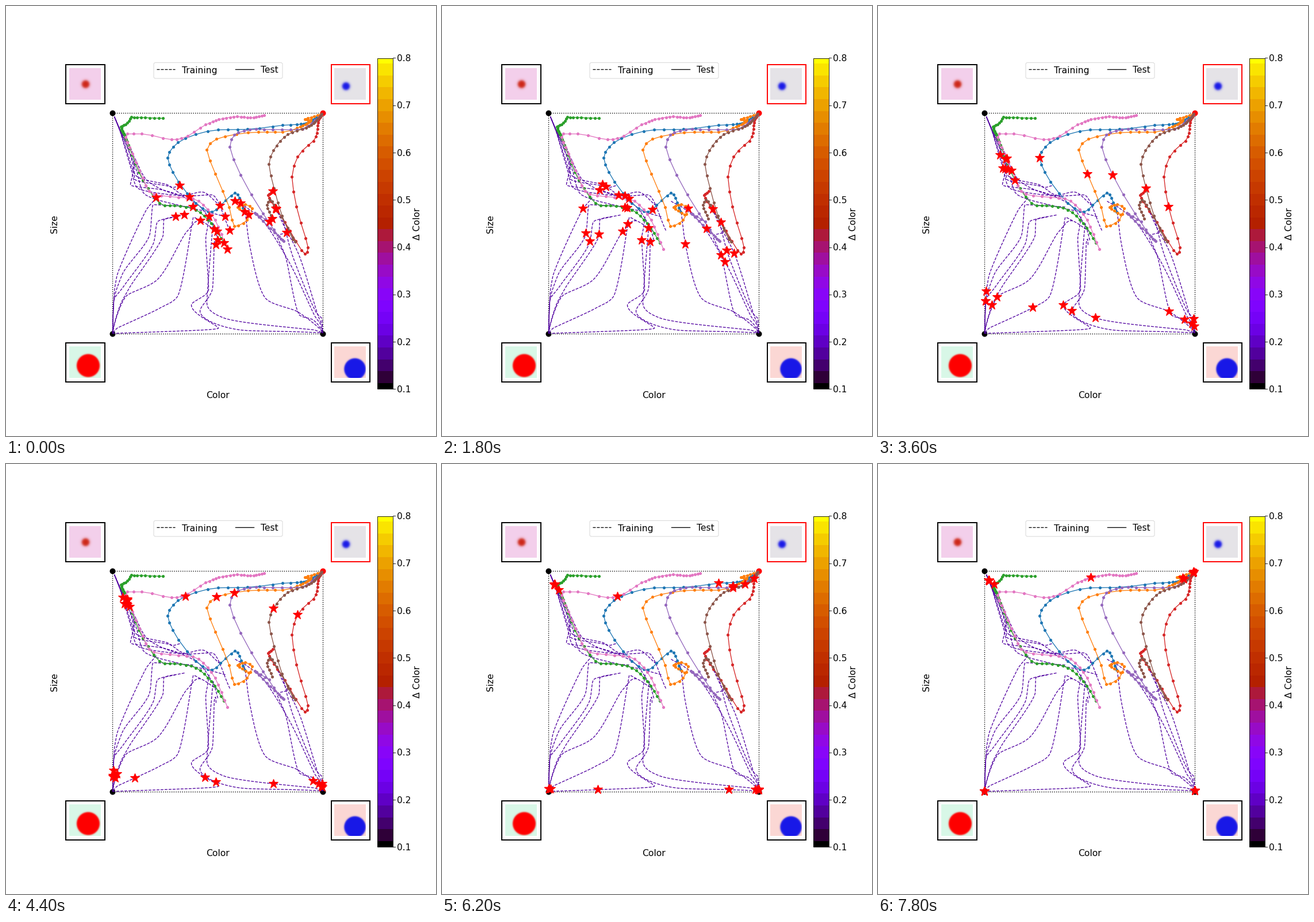
A matplotlib script that plays this animation: 748 px wide and 748 px high, repeating every 8000 ms.

```python
import numpy as np
import matplotlib.pyplot as plt
from matplotlib.animation import FuncAnimation
from matplotlib.patches import FancyBboxPatch, Rectangle

SIZE, FRAMES, STEP = 748, 40, 200
LW = 0.95
LEFT, RIGHT, TOP, BOTTOM = 185, 551, 186, 570
BEATS = (0, 4.5, 9, 14, 18, 26, 31)  # steps at which training paths pass their points

plt.rcParams["font.family"] = "DejaVu Sans"
plt.rcParams["font.size"] = 11.2
fig = plt.figure(figsize=(SIZE / 100, SIZE / 100), dpi=100, facecolor="white")
ax = fig.add_axes([0, 0, 1, 1])
ax.axis("off")

tracks = []  # one position function per star


def glide(keys):
    """Monotone cubic path through (time, x, y) keys."""
    k = np.array(keys, float)
    times, pts = k[:, 0], k[:, 1:]
    h = np.diff(times)[:, None]
    d = np.diff(pts, axis=0) / h
    a, b = d[:-1], d[1:]
    wa, wb = 2 * h[1:] + h[:-1], h[1:] + 2 * h[:-1]
    with np.errstate(divide="ignore", invalid="ignore"):
        inner = np.where(a * b > 0, (wa + wb) / (wa / a + wb / b), 0)
    m = np.vstack([d[:1], inner, d[-1:]])

    def at(t):
        t = np.clip(np.atleast_1d(t), times[0], times[-1])
        i = np.clip(np.searchsorted(times, t, side="right") - 1, 0, len(h) - 1)
        u = ((t - times[i]) / h[i, 0])[:, None]
        return (pts[i] * (1 + 2 * u) * (1 - u) ** 2
                + pts[i + 1] * u * u * (3 - 2 * u)
                + h[i] * (m[i] * u * (1 - u) ** 2 - m[i + 1] * u * u * (1 - u)))

    return at


def add_path(keys, times, style, **kw):
    at = glide(keys)
    ax.plot(*at(times).T, style, lw=LW, **kw)
    tracks.append(lambda n: at(n)[0])


def train(hub, end, t_end, *paths):
    """Dashed paths that close in on a hub, then creep to the end point."""
    hub = np.array(hub)
    for pts in paths:
        if len(pts) < len(BEATS):
            pts = (*pts, hub + 0.08 * (np.array(pts[-1]) - hub))
        keys = [(t, *p) for t, p in zip(BEATS, pts)] + [(t_end, *end)]
        add_path(keys, np.linspace(0, t_end, 240), "--", color="#5000a0", zorder=3)


def test(color, *keys):
    """Solid path with a dot at every step."""
    add_path(keys, np.arange(keys[-1][0] + 1), "-o", color="tab:" + color,
             ms=3.7, mew=0, zorder=4)


def thumb(x, y, back, spot, cx, cy, r, soft, edge="black"):
    """Framed picture of one blurred disc."""
    ax.add_patch(Rectangle((x, y), 67.5, 68, fc="white", ec=edge, lw=1.4, zorder=2))
    g = np.arange(55)
    dist = np.hypot(g[None, :] + x + 6 - cx, g[:, None] + y + 6.5 - cy)
    mix = (1 / (1 + np.exp((dist - r) / soft)))[..., None]
    img = (np.array(back) * (1 - mix) + np.array(spot) * mix) / 255
    ax.imshow(img, extent=(x + 5.5, x + 60.5, y + 61, y + 6),
              aspect="auto", zorder=2.5)


def upright(x, y, text):
    ax.text(x, y, text, rotation=90, rotation_mode="anchor", ha="center", va="baseline")


def color_bar(x0, x1, y0, y1, ticks=8, sub=4):
    """Bands centred on every quarter tick, cut off at both ends."""
    n = (ticks - 1) * sub
    half = (y1 - y0) / n / 2
    box = Rectangle((x0, y0), x1 - x0, y1 - y0, fill=False, ec="black", lw=0.6, zorder=3)
    ax.add_patch(box)
    bands = ax.imshow(np.arange(n, -1, -1)[:, None] / n, cmap="gnuplot", vmin=0, vmax=1,
                      extent=(x0, x1, y1 + half, y0 - half), aspect="auto",
                      interpolation="nearest")
    bands.set_clip_path(box)
    for i, y in enumerate(np.linspace(y1, y0, ticks)):
        ax.plot([x1, x1 + 4], [y, y], "k-", lw=0.6)
        ax.text(679.5, y + 5.5, f"0.{i + 1}")


# frame and corners
ax.plot([LEFT, RIGHT, RIGHT, LEFT, LEFT], [TOP, TOP, BOTTOM, BOTTOM, TOP],
        "k:", lw=1, zorder=1)
for x in (LEFT, RIGHT):
    for y in (TOP, BOTTOM):
        color = "red" if (x, y) == (RIGHT, TOP) else "black"
        ax.plot(x, y, "o", color=color, ms=7.2, mew=0, zorder=2)

RED, BLUE = (255, 0, 0), (24, 24, 232)
thumb(104, 101.5, (244, 208, 236), (205, 38, 22), 138, 135.5, 6.5, 1.3)
thumb(565.5, 101.5, (230, 228, 232), BLUE, 591.5, 139, 6.5, 1.2, "red")
thumb(104, 586, (216, 248, 232), RED, 142.5, 625.5, 20, 0.7)
thumb(565.5, 586, (252, 216, 212), BLUE, 607, 631.5, 18.7, 0.7)

# legend
ax.add_patch(FancyBboxPatch((256.5, 98), 224, 27.5, fc="white", ec="0.85", lw=0.75,
                            boxstyle="round,pad=0,rounding_size=3"))
for x, style, name in [(262, "k--", "Training"), (399, "k-", "Test")]:
    ax.plot([x, x + 32], [110, 110], style, lw=LW)
    ax.text(x + 44, 116, name)

color_bar(646, 673, 90, 666)
ax.text(367.5, 682, "Color", ha="center")
upright(88.5, 379, "Size")
upright(719.5, 378, "Δ Color")

# upper left
train((196, 211), (188, 192), 56,
      ((302, 312), (290, 315), (279, 310), (227, 296), (212, 259)),
      ((319, 332), (303, 326), (285, 314), (223, 300), (222, 266)),
      ((372, 347), (340, 323), (307, 329), (246, 304), (224, 265)),
      ((389, 390), (357, 328), (318, 330), (228, 316), (217, 282)),
      ((381, 366), (352, 358), (318, 350), (239, 325), (226, 284)),
      ((367, 392), (333, 345), (274, 320), (216, 310), (221, 283)))

# lower left
train((185, 564), (185, 569), 39,
      ((261, 333), (254, 341), (245, 352), (192, 471), (188, 496)),
      ((325, 349), (256, 345), (250, 395), (201, 468), (187, 513)),
      ((295, 366), (263, 375), (257, 409), (205, 486), (187, 513)),
      ((310, 363), (274, 372), (273, 397), (214, 490), (198, 520)),
      ((362, 388), (335, 373), (314, 392), (261, 477), (207, 506)),
      ((338, 373), (326, 367), (323, 379), (297, 506), (269, 524)),
      ((353, 366), (350, 385), (347, 407), (352, 492), (322, 520), (369, 560), (271, 566)))

# lower right
train((550, 565), (551, 568), 39,
      ((365, 415), (364, 405), (362, 410), (359, 489), (337, 530), (418, 564), (499, 566)),
      ((368, 407), (360, 378), (359, 386), (349, 516), (378, 542)),
      ((398, 339), (413, 350), (423, 414), (452, 509), (506, 531)),
      ((488, 394), (471, 400), (485, 433), (511, 538), (533, 545)),
      ((408, 343), (443, 370), (492, 445), (538, 541), (546, 552)),
      ((470, 353), (481, 373), (495, 425), (540, 534), (549, 544)),
      ((469, 352), (482, 380), (508, 430), (543, 540), (550, 557)))

test("blue", (0, 415, 358), (5, 398, 325), (8, 373, 346), (10, 358, 358), (12, 342, 352),
     (16, 290, 289), (18, 281, 264), (21, 299, 237), (25, 369, 215), (28, 420, 214),
     (31, 481, 207), (34, 513, 205), (47, 549, 188))
test("orange", (0, 422, 363), (4, 403, 350), (7, 416, 345), (9, 428, 352), (11, 419, 372),
     (14, 397, 383), (16, 388, 350), (18, 364, 292), (20, 349, 250), (22, 366, 231),
     (26, 439, 219), (29, 481, 219), (31, 506, 212), (39, 530, 198), (41, 520, 197),
     (47, 547, 188))
test("green", (0, 379, 412), (4, 357, 378), (9, 322, 351), (12, 293, 347), (14, 276, 347),
     (18, 238, 303), (22, 215, 248), (26, 207, 228), (38, 200, 210), (42, 211, 203),
     (45, 218, 193), (53, 273, 195))
test("red", (0, 464, 322), (3, 456, 329), (9, 485, 376), (13, 520, 431), (15, 525, 420),
     (18, 505, 349), (20, 497, 297), (22, 507, 262), (26, 539, 227), (31, 543, 199),
     (39, 549, 187))
test("purple", (0, 458, 375), (4, 433, 360), (9, 460, 387), (13, 483, 409), (14, 478, 405),
     (16, 447, 361), (18, 408, 294), (20, 389, 245), (22, 397, 224), (26, 435, 214),
     (31, 506, 215), (35, 537, 199), (39, 548, 189))
test("brown", (0, 463, 370), (4, 454, 346), (6, 459, 337), (9, 471, 353), (13, 503, 410),
     (14, 499, 406), (16, 480, 365), (18, 466, 317), (20, 457, 275), (22, 465, 251),
     (26, 490, 223), (31, 527, 209), (39, 549, 188))
test("pink", (0, 385, 423), (5, 357, 362), (9, 325, 335), (12, 285, 331), (14, 256, 327),
     (18, 232, 286), (20, 220, 257), (23, 208, 228), (24, 211, 222), (26, 236, 222),
     (29, 288, 232), (31, 305, 230), (35, 347, 206), (39, 370, 197), (44, 402, 192),
     (48, 425, 194), (53, 449, 190))

stars, = ax.plot([], [], "*", color="red", ms=12, mew=0.8, zorder=6)
ax.set_xlim(-0.5, SIZE - 0.5)
ax.set_ylim(SIZE - 0.5, -0.5)


def draw(n):
    stars.set_data(*np.array([pos(n) for pos in tracks]).T)
    return stars,


anim = FuncAnimation(fig, draw, frames=FRAMES, interval=STEP, repeat=True, repeat_delay=0)
plt.show()
```
